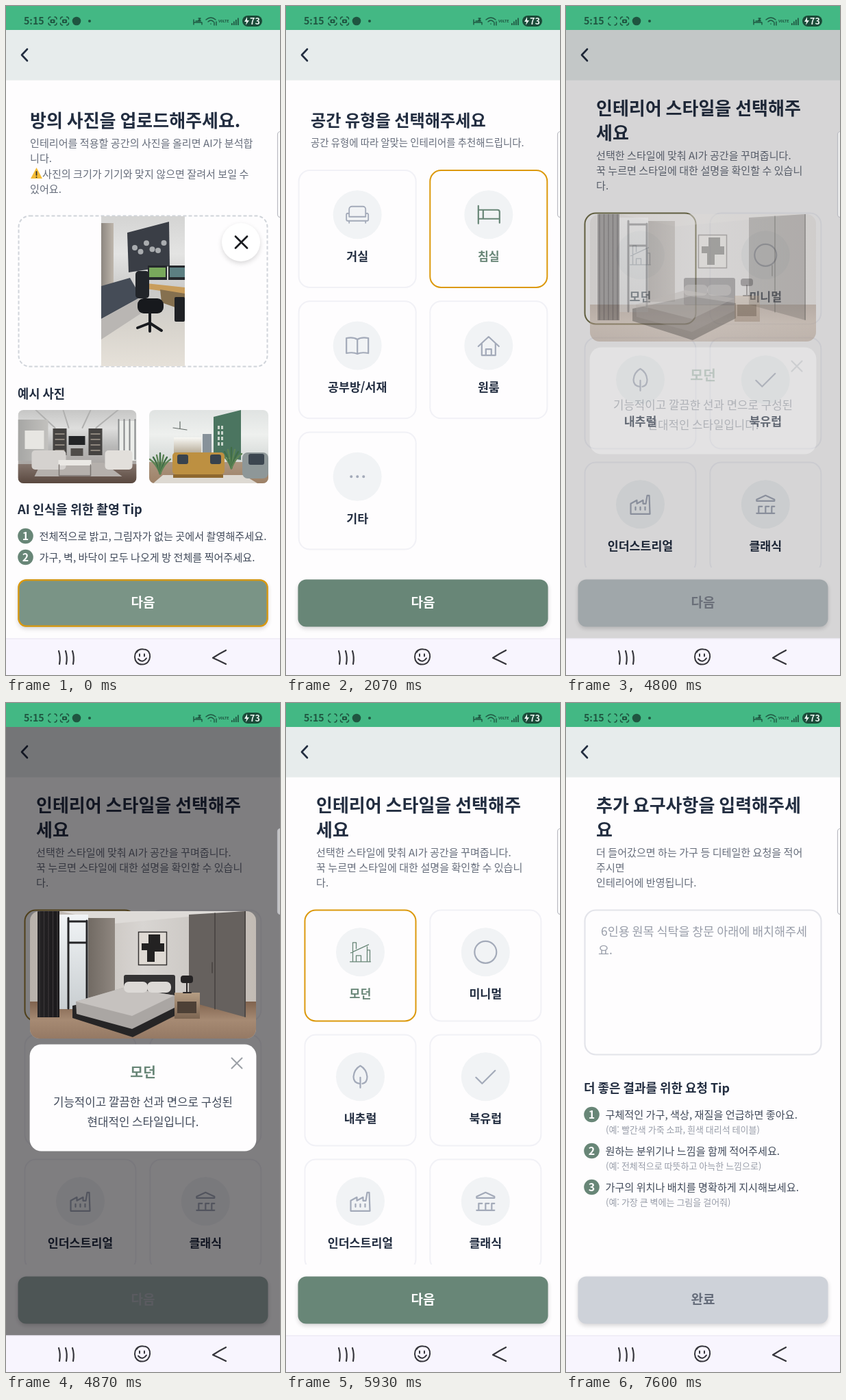
An HTML page with a canvas that plays this animation: 400x977 px, repeating every 8000 ms.

```html
<!DOCTYPE html>
<html lang="ko">
<head>
<meta charset="utf-8">
<title>Room setup</title>
<style>
html, body { margin: 0; width: 100%; height: 100%; overflow: hidden; background: #fefdfe; }
canvas { display: block; width: 400px; height: 977px; }
</style>
</head>
<body>
<canvas id="stage" width="400" height="977"></canvas>
<script>
const LOOP = 8000;
const FONT = '"Noto Sans CJK KR", "Noto Sans CJK", "Noto Sans", sans-serif';
const INK = '#222d40', BODY = '#666d7b', TIP = '#414a5a', HINT = '#989da9';
const GREEN = '#688677', GOLD = '#dc990c', DARK = '#1f5540', PEN = '#35353b';
const PALE = '#f1f3f5', EDGE = '#f1f1f6', ICON = '#a3aab9', PAGE = '#fefdfe';
const ctx = document.getElementById('stage').getContext('2d');

const clamp = v => Math.max(0, Math.min(1, v));
const repeat = (n, draw) => { for (let i = 0; i < n; i++) draw(i); };
const channels = c => [1, 3, 5].map(i => parseInt(c.slice(i, i + 2), 16));
function mix(a, b, p) {
  const to = channels(b);
  return `rgb(${channels(a).map((v, i) => Math.round(v + (to[i] - v) * p)).join()})`;
}

// Text is placed by the optical centre of its line.
function text(str, x, y, size, color = INK, weight = 700, align = 'left') {
  ctx.font = `${weight} ${size}px ${FONT}`;
  ctx.textAlign = align;
  ctx.fillStyle = color;
  ctx.fillText(str, x, y + size * 0.37);
}
const label = (str, x, y, size, color, weight = 700) => text(str, x, y, size, color, weight, 'center');
function heading(y, x, ...rows) {
  rows.forEach((row, i) => text(row, x, y + i * 36, 26));
}
function notes(y, x, ...rows) {
  rows.forEach((row, i) => text(row, x, y + i * 22.3, 15.1, BODY, 500));
}

function rect(color, x, y, w, h) {
  ctx.fillStyle = color;
  ctx.fillRect(x, y, w, h);
}
function fade(colors, x, y, w, h, across) {
  const g = ctx.createLinearGradient(x, y, across ? x + w : x, across ? y : y + h);
  colors.forEach((c, i) => g.addColorStop(i / (colors.length - 1), c));
  rect(g, x, y, w, h);
}
function round(x, y, w, h, r, fill, line, width = 2) {
  ctx.beginPath();
  ctx.roundRect(x, y, w, h, r);
  if (fill) { ctx.fillStyle = fill; ctx.fill(); }
  if (line) { ctx.strokeStyle = line; ctx.lineWidth = width; ctx.stroke(); }
}
function disc(x, y, r, fill) {
  ctx.beginPath();
  ctx.arc(x, y, r, 0, Math.PI * 2);
  ctx.fillStyle = fill;
  ctx.fill();
}
function shape(d, color) {
  ctx.fillStyle = color;
  ctx.fill(new Path2D(d));
}
function line(d, x, y, color, width) {
  ctx.save();
  ctx.translate(x, y);
  ctx.strokeStyle = color;
  ctx.lineWidth = width;
  ctx.lineCap = ctx.lineJoin = 'round';
  ctx.stroke(new Path2D(d));
  ctx.restore();
}
// Draws inside a rounded frame whose top left corner is the origin.
function framed(x, y, w, h, r, draw) {
  ctx.save();
  ctx.translate(x, y);
  ctx.beginPath();
  ctx.roundRect(0, 0, w, h, r);
  ctx.clip();
  draw();
  ctx.restore();
}
function shadow(blur, dy, alpha, draw) {
  ctx.save();
  ctx.shadowColor = `rgba(0,0,0,${alpha})`;
  ctx.shadowBlur = blur;
  ctx.shadowOffsetY = dy;
  draw();
  ctx.restore();
}
const cross = (x, y, r, color, width) => line(`M${-r} ${-r}L${r} ${r}M${r} ${-r}L${-r} ${r}`, x, y, color, width);

const icons = {
  sofa: 'M-12-1V-8a4 4 0 0 1 4-4H8a4 4 0 0 1 4 4V-1M-12 3V0a2 2 0 0 0-4 0V7a2 2 0 0 0 2 2H14a2 2 0 0 0 2-2V0a2 2 0 0 0-4 0V3ZM-12 9V12M12 9V12',
  bed: 'M-15-13V13M-15-7H13a3 3 0 0 1 3 3V12M-15 6H16M-8-7V6',
  book: 'M0-9Q-6-13-16-11V11Q-6 9 0 12Q6 9 16 11V-11Q6-13 0-9V12',
  house: 'M-15 1L0-13L15 1M-10-3V14H10V-3M-4 14V5H4V14',
  dots: 'M-9 0h.1M0 0h.1M9 0h.1',
  modern: 'M-15 14H15M-11 14V-2M10 14V-8M-14 1L12-11M-11-2V-14H-6V-5M10-3H14V14M-6 14V5H1V14',
  minimal: 'M16 0A16 16 0 1 1-16 0A16 16 0 1 1 16 0',
  leaf: 'M0 16V1M-1 10Q-10 9-10 0Q-9-11 0-16Q9-11 10 0Q10 9 3 10',
  check: 'M-14 1L-5 10L14-9',
  factory: 'M-14 14V-1L-5-6V-1L4-6V-1H8L10-13H13L14 14ZM-7 4V8M0 4V8M7 4V8',
  classic: 'M-13-5H13V-7L0-13L-13-7ZM-13 13H13M-10 12V3H-5M0 12V3H5M9 12V3H13'
};
const weights = { modern: 1.3, sofa: 1.8, dots: 4 };

function card(x, y, size, [name, caption], p) {
  round(x + 1, y + 1, size - 2, size - 2, 16, PAGE, p ? mix('#5f6757', GOLD, p) : EDGE);
  const cx = x + size / 2, cy = y + size * 0.38;
  disc(cx, cy, 35.5, PALE);
  line(icons[name], cx, cy, mix(ICON, GREEN, p), weights[name] || 2.2);
  label(caption, cx, cy + 61, 17.3, mix(INK, GREEN, p));
}
function grid(items, x, y, size, pitch, picked, p) {
  items.forEach((item, i) =>
    card(i % 2 ? 209.3 : x, y + (i >> 1) * pitch, size, item, i === picked ? p : 0));
}

function button(caption, p, pressed) {
  const fill = pressed ? '#7a9486' : mix('#ced2d9', GREEN, p);
  shadow(6, 3, 0.16, () => round(17.5, 837.5, 365, 69, 12, fill));
  if (pressed) round(18.4, 838.4, 363.2, 67.2, 11, null, GOLD, 2.2);
  label(caption, 200, 871, 19, mix(BODY, '#ffffff', p));
}
function bullet(n, x, y, tip) {
  disc(x + 11, y, 11.3, GREEN);
  label(n, x + 11, y, 16, '#ffffff');
  text(tip, x + 31, y, 15.15, TIP, 500);
}

function deskPhoto() {
  fade(['#d4d4d3', '#e4e4e3', '#c9c9c8', '#d8d4cd', '#e6e1d9'], 0, 0, 122, 219);
  fade(['#8d8780', '#beb6ac'], 0, 10, 18, 100, true);
  shape('M38 24L99 8L100 73L40 82Z', '#3a3e46');
  repeat(6, i => disc(49 + i * 8.5, 46 + 7 * Math.sin(i * 2.2), 4, '#a9acaf'));
  shape('M0 102L42 90L58 118L0 150Z', '#454c57');
  shape('M0 150L58 118V142L0 180Z', '#b9b6b3');
  shape('M66 98L122 104V114L66 106Z', '#c89d5c');
  shape('M86 107L122 113V138L88 126Z', '#85704f');
  repeat(2, i => {
    rect('#25282c', 68 + i * 30, 72, 28, 21);
    rect(i ? '#5c7f82' : '#79a85c', 70 + i * 30, 75, 24, 14);
  });
  round(107, 118, 15, 36, 2, '#1f2125');
  round(50, 80, 20, 40, 5, '#22252a');
  round(53, 120, 38, 22, 9, '#17191d');
  line('M71 140V158M53 163L71 156L88 167M71 156V168', 0, 0, '#191b1f', 4);
}

function loungePhoto() {
  fade(['#c6c6c5', '#dededd', '#b8b8b7', '#aaa6a3', '#a09892'], 0, 0, 173, 107);
  repeat(4, i => line(`M${26 + i * 40} 0L${54 + i * 20} 26`, 0, 0, '#b0b0af', 2));
  fade(['#a6a6a4', '#c2c1be'], 0, 14, 44, 60, true);
  rect('#e7e6e2', 10, 30, 28, 27);
  repeat(2, side => {
    rect('#454341', 51 + side * 52, 27, 20, 39);
    repeat(4, i => rect('#8c857c', 54 + side * 52, 34 + i * 8, 14, 2));
  });
  rect('#222426', 74, 38, 24, 13);
  rect('#4f4c49', 77, 56, 18, 11);
  rect('#eceeeb', 146, 16, 27, 58);
  repeat(4, i => line(`M${147 + i * 8} 14V72`, 0, 0, '#858889', 2));
  fade(['#85756d', '#59483f'], 0, 79, 173, 28);
  shape('M34 77H125L152 97H24Z', '#b5b0ac');
  repeat(2, i => round(20 + i * 107, 59, 50 - i * 10, 28, 5, i ? '#e2dfdb' : '#d5d2cf'));
  rect('#eae8e4', 59, 73, 48, 8);
  line('M60 80V96H106V80', 0, 0, '#7b7470', 1.5);
}

function plant(x, y, s) {
  repeat(7, i => {
    const a = i - 3;
    line(`M0 ${s}Q${a * 2} 0 ${a * s / 3} ${Math.abs(a) * 3 - s}`, x, y, i % 2 ? '#416e47' : '#5d8454', 2.4);
  });
}
function sofaPhoto() {
  fade(['#e0e3e2', '#eef0ee', '#d6dad8', '#cfcac1'], 0, 0, 174, 107);
  shape('M94 10L134 0V73L94 66Z', '#4b7560');
  repeat(8, i => rect('#cbd6cd', 100 + i % 2 * 5, 23 + (i >> 1) * 8, 3, 5));
  fade(['#f8f8f5', '#b4a995'], 36, 40, 40, 24);
  rect('#87929a', 78, 35, 13, 31);
  line('M35 26L55 29M45 17V27', 0, 0, '#626a66', 1.2);
  fade(['#ac9680', '#9d8167'], 0, 76, 174, 31);
  shape('M20 95H138L158 107H6Z', '#ddd9d2');
  repeat(2, i => plant(16 + i * 104, 78 - i * 8, 15));
  round(34, 62, 76, 32, 5, '#bd9041');
  rect('#8e682f', 35, 94, 73, 5);
  repeat(2, i => round(41 + i * 48, 65, 16, 14, 3, '#38424d'));
  round(136, 62, 38, 38, 8, '#8e9798');
  round(145, 64, 23, 16, 3, '#3c4650');
}

function bedroomPhoto() {
  fade(['#b9b2ab', '#c6c0bb', '#d8d5d2', '#cbc7c3', '#c2bbb4'], 0, 0, 330, 186, true);
  shape('M44 0H310L232 8L124 18Z', '#dedbd8');
  fade(['#80634e', '#a68a73', '#957964'], 0, 132, 330, 54);
  fade(['#f1f4f6', '#c9ced1'], 43, 5, 42, 138);
  line('M56 10V142M83 14V134M56 46H83M56 15H83', 0, 0, '#252527', 3);
  fade(['#716a63', '#8f8780'], 85, 10, 39, 118, true);
  fade(['#252325', '#1b191b'], 11, 0, 32, 155, true);
  repeat(5, i => line('M0 0V154', 14 + i * 6.5, 0, '#3a3638', 1.3));
  shape('M232 5L315 0V155L232 132Z', '#66615e');
  line('M270 3V143M314 0V154M266 75V90', 0, 0, '#45413e', 1.5);
  round(158.5, 30.5, 41, 48, 0, '#dfdad4', '#353332', 1.5);
  shape('M173 34H190V47H196V59H182V74H171V57H163V47H173Z', '#232222');
  round(137, 93, 75, 40, 3, '#343334');
  shape('M62 138L147 120L213 130V152L150 184L62 156Z', '#262526');
  shape('M67 132L139 111L211 123V141L149 172L68 150Z', '#aaa6a3');
  shape('M67 132L139 111L211 123L149 153Z', '#c6c2bf');
  repeat(2, i => round(137 + i * 34, 103, 35, 16, 7, '#dcd9d6'));
  fade(['#b69e84', '#7c6551'], 211, 119, 37, 38);
  rect('#4d4036', 215, 132, 28, 17);
  line('M229 104V119M224 119H235', 0, 0, '#282425', 2);
  round(220, 94, 18, 11, 4, '#252324');
}

function uploadScreen() {
  heading(167, 35, '방의 사진을 업로드해주세요.');
  notes(200, 35, '인테리어를 적용할 공간의 사진을 올리면 AI가 분석합', '니다.');
  notes(245, 53, '사진의 크기가 기기와 맞지 않으면 잘려서 보일 수');
  notes(267, 35, '있어요.');
  shape('M44.5 236L53 252H36Z', '#f4bc35');
  line('M44.5 242V247M44.5 250V250.2', 0, 0, '#35302a', 1.8);
  ctx.setLineDash([5, 3]);
  round(18.5, 306.5, 363, 220, 16, null, '#d0d4da');
  ctx.setLineDash([]);
  framed(139, 307, 122, 219, 0, deskPhoto);
  shadow(7, 3, 0.15, () => disc(343, 345, 28, '#ffffff'));
  cross(343.5, 345, 8.5, '#191b20', 2.7);
  text('예시 사진', 17, 566, 17.7);
  framed(17.5, 590, 173, 107, 8, loungePhoto);
  framed(209, 590, 174, 107, 8, sofaPhoto);
  text('AI 인식을 위한 촬영 Tip', 17, 735, 18.4);
  bullet('1', 17.5, 774, '전체적으로 밝고, 그림자가 없는 곳에서 촬영해주세요.');
  bullet('2', 17.5, 805, '가구, 벽, 바닥이 모두 나오게 방 전체를 찍어주세요.');
  button('다음', 1, true);
}

const rooms = [['sofa', '거실'], ['bed', '침실'], ['book', '공부방/서재'], ['house', '원룸'], ['dots', '기타']];
function roomScreen(t) {
  const p = t < 1000 ? 0 : clamp((t - 900) / 200);
  text('공간 유형을 선택해주세요', 36, 167, 24.2);
  text('공간 유형에 따라 알맞는 인테리어를 추천해드립니다.', 36, 200, 14.4, BODY, 500);
  grid(rooms, 17.7, 239, 173, 191.3, 1, p);
  button('다음', p, t >= 2530);
}

const styles = [['modern', '모던'], ['minimal', '미니멀'], ['leaf', '내추럴'], ['check', '북유럽'], ['factory', '인더스트리얼'], ['classic', '클래식']];
function styleScreen(t) {
  const p = t < 4800 ? 0 : clamp((t - 4770) / 200);
  heading(149, 44, '인테리어 스타일을 선택해주', '세요');
  notes(218, 44, '선택한 스타일에 맞춰 AI가 공간을 꾸며줍니다.', '꾹 누르면 스타일에 대한 설명을 확인할 수 있습니', '다.');
  framed(0, 0, 400, 820, 0, () => grid(styles, 26.5, 301.5, 164, 182, 0, p));
  button('다음', p, t >= 7270);
  if (t >= 4800 && t < 5930) modal(clamp((t - 4770) / 100));
}

function modal(p) {
  ctx.globalAlpha = p;
  rect('rgba(3,0,4,.5)', 0, 35, 400, 889);
  framed(35, 304, 330, 186, 14, bedroomPhoto);
  round(34.6, 498.5, 330.8, 156, 17, PAGE);
  cross(337, 526, 7.5, '#9ca0a7', 2);
  label('모던', 200, 539, 20.5, GREEN);
  label('기능적이고 깔끔한 선과 면으로 구성된', 200, 583, 16.8, TIP, 500);
  label('현대적인 스타일입니다.', 200, 612, 16.8, TIP, 500);
  ctx.globalAlpha = 1;
}

const tips = [
  ['구체적인 가구, 색상, 재질을 언급하면 좋아요.', '(예: 빨간색 가죽 소파, 흰색 대리석 테이블)'],
  ['원하는 분위기나 느낌을 함께 적어주세요.', '(예: 전체적으로 따뜻하고 아늑한 느낌으로)'],
  ['가구의 위치나 배치를 명확하게 지시해보세요.', '(예: 가장 큰 벽에는 그림을 걸어줘)']
];
function requestScreen() {
  heading(149, 44, '추가 요구사항을 입력해주세', '요');
  notes(218, 44, '더 들어갔으면 하는 가구 등 디테일한 요청을 적어', '주시면', '인테리어에 반영됩니다.');
  round(27.5, 302.5, 345, 211, 16, PAGE, '#e3e4ea', 2.2);
  text('6인용 원목 식탁을 창문 아래에 배치해주세', 51, 334, 17.4, HINT, 500);
  text('요.', 47, 361, 17.4, HINT, 500);
  text('더 좋은 결과를 위한 요청 Tip', 26, 562, 17.9);
  tips.forEach(([tip, example], i) => {
    const y = 601 + i * 53;
    bullet(i + 1, 26.5, y, tip);
    text(example, 58, y + 22, 13, HINT, 500);
  });
  button('완료', 0, false);
}

function scanIcon(x, filled) {
  repeat(4, i => {
    const sx = i % 2 ? 1 : -1, sy = i > 1 ? 1 : -1;
    line(`M${6 * sx} ${3 * sy}Q${6 * sx} ${6 * sy} ${3 * sx} ${6 * sy}`, x, 22, DARK, 1.5);
  });
  if (filled) {
    round(x - 3.5, 19.5, 7, 5.5, 1.5, DARK);
    disc(x, 22.2, 1.2, '#43b884');
  }
}
function statusBar(t) {
  rect('#43b884', 0, 0, 400, 35);
  text('5:15', 26, 22, 14.2, DARK);
  scanIcon(68, Math.floor((t + 20) / 506) % 2 === 0);
  scanIcon(85.5, true);
  disc(103, 22, 6.3, DARK);
  disc(122, 22, 2, DARK);
  line('M-6-2V5M-6 2H6V5M-3 0H4M1-4H4L1-1H4', 280, 22, DARK, 1.4);
  line('M-7-2Q0-8 7-2M-4 1Q0-3 4 1M0 4V4.2M5 2V6M8 1V6', 299, 22, DARK, 1.4);
  text('VoLTE', 310, 22.5, 5.4, DARK);
  repeat(4, i => rect(DARK, 329 + i * 3, 25 - i * 2.5, 1.7, 3 + i * 2.5));
  round(345, 14, 29, 16, 8, '#1b4b39');
  shape('M352 16L348 23H351L350 28L355 21H352Z', '#e9f5ef');
  text('73', 356, 22, 12.5, '#e9f5ef');
}
function navBar() {
  rect('#f8f5fe', 0, 923.5, 400, 54);
  rect('#e9e6f1', 0, 923.5, 400, 1);
  repeat(3, i => line('M0-9Q3 0 1 10', 77 + i * 10, 951, PEN, 2.2));
  line('M-1-11C-15-11-14 12 0 11C14 11 15-11 2-11Q-5-12-8-7M-4-4V-1M3-4V-1M-6 3Q0 10 6 2', 199, 950.5, PEN, 2);
  line('M19-10Q9-5 0 1Q9 5 19 10', 302, 951, PEN, 2.2);
}

const screens = [[7330, requestScreen], [2600, styleScreen], [130, roomScreen], [0, uploadScreen]];
function render(t) {
  rect(PAGE, 0, 0, 400, 977);
  rect('#e7ecec', 0, 35, 400, 73.5);
  line('M31 63L23 71.5L31 80', 0, 0, INK, 2.6);
  screens.find(([from]) => t >= from)[1](t);
  statusBar(t);
  navBar();
  round(396.5, 183.5, 12, 125, 4, 'rgba(255,255,255,.55)', '#b9bac1', 1.2);
}

const start = performance.now();
function tick(now) {
  render(Math.max(0, now - start) % LOOP);
  requestAnimationFrame(tick);
}
render(0);
requestAnimationFrame(tick);
</script>
</body>
</html>
```
